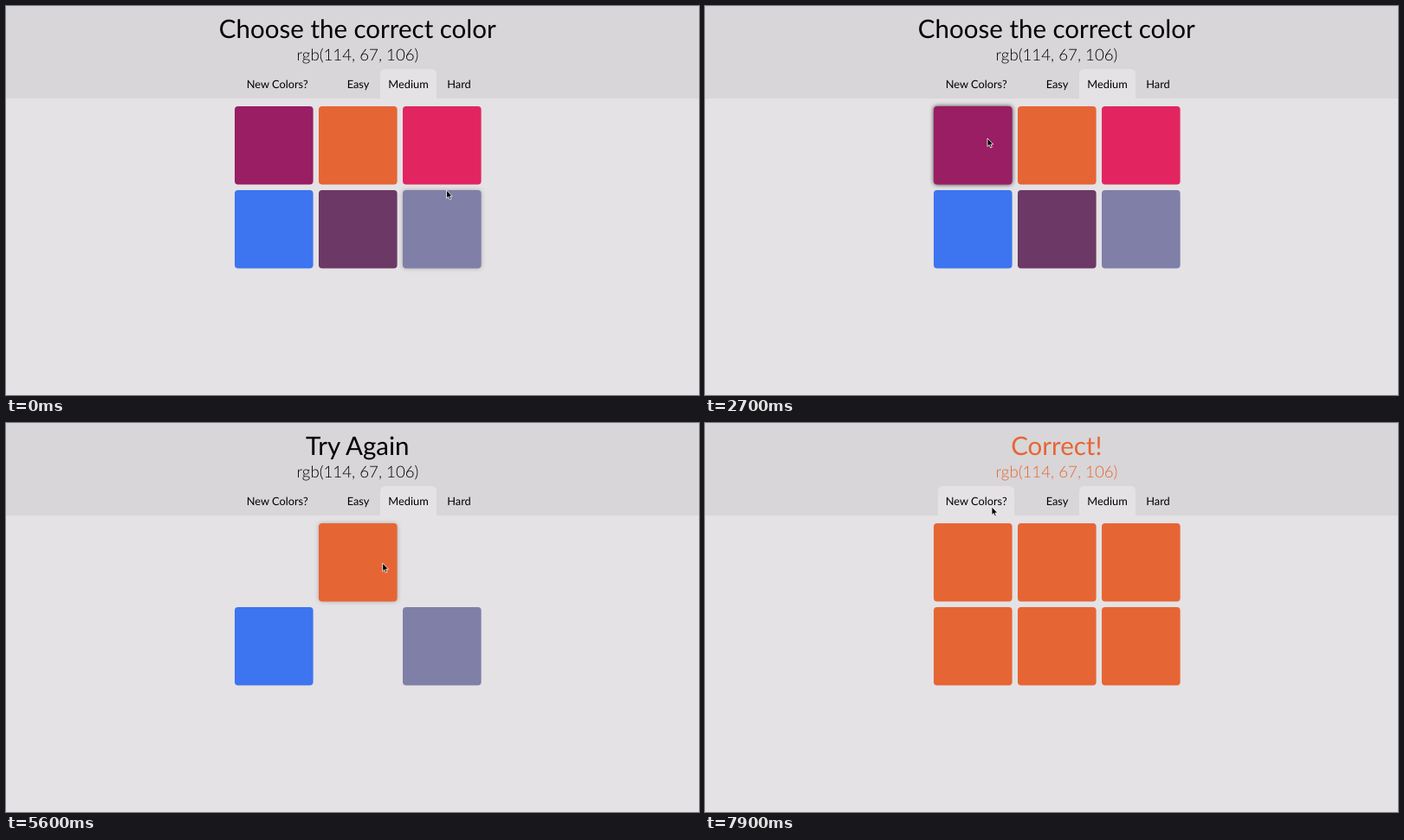
Animation, 800 px wide and 450 px high, one loop 8000 ms. Source, as an HTML page:

```html
<!DOCTYPE html>
<html lang="en">
<head>
<meta charset="utf-8">
<title>Choose the correct color</title>
<style>
  html, body { margin: 0; width: 100%; height: 100%; overflow: hidden; background: #e4e2e4; }
  svg { display: block; width: 800px; height: 450px; }
  text { font-family: Lato, sans-serif; text-anchor: middle; text-rendering: geometricPrecision; }
  #title { font-size: 29.5px; }
  #code { font-size: 18.7px; font-weight: 300; }
  #menu { font-size: 12.8px; }
</style>
</head>
<body>
<svg viewBox="0 0 800 450">
  <rect width="800" height="450" fill="#e4e2e4"/>
  <rect width="800" height="107" fill="#d8d6d8"/>
  <path id="tab" d="M269 107V79q0-6 6-6h76q6 0 6 6v28z" fill="#e4e2e4"/>
  <path d="M432 107V79q0-6 6-6h53q6 0 6 6v28z" fill="#e4e2e4"/>
  <text id="title" x="405.8" y="37.3"></text>
  <text id="code" x="406" y="63">rgb(114, 67, 106)</text>
  <g id="menu">
    <text x="313.2" y="95">New Colors?</text>
    <text x="406.5" y="95">Easy</text>
    <text x="464.5" y="95">Medium</text>
    <text x="523" y="95">Hard</text>
  </g>
  <g id="board"></g>
  <path id="cursor" d="M0 0V9.6L2.2 7.6L3.7 11L5.3 10.3L3.9 7H6.8Z" fill="#000" stroke="#fff" stroke-width=".8"/>
</svg>
<script>
const LOOP = 8000, STEP = 100, FADE = 700, HOVER = 300, SIZE = 90.6;
const BACK = [228, 226, 228], ORANGE = [230, 101, 52], WIN = 6100;
const $ = id => document.getElementById(id);

// colour and, for wrong guesses, the time of the click
const squares = [
  { rgb: [153, 30, 100], click: 2900 },
  { rgb: ORANGE },
  { rgb: [226, 37, 97], click: 4850 },
  { rgb: [61, 116, 239] },
  { rgb: [108, 56, 101], click: 4050 },
  { rgb: [127, 127, 168] }
].map((s, i) => {
  const x = 264 + i % 3 * 97, y = i < 3 ? 116 : 213;
  const el = document.createElementNS('http://www.w3.org/2000/svg', 'rect');
  const attrs = { x, y, width: SIZE, height: SIZE, rx: 4 };
  for (const name in attrs) el.setAttribute(name, attrs[name]);
  $('board').append(el);
  return { ...s, el, box: [x, y, SIZE, SIZE] };
});

// pointer stops: time, x, y
const path = [
  [-100, 505, 209], [-50, 508.5, 213], [1250, 508.5, 213],
  [2350, 326, 153], [3450, 326, 153], [3800, 396.5, 247],
  [4200, 396.5, 247], [4650, 522, 162.5], [5300, 522, 162.5],
  [5700, 418.5, 162], [7250, 418.5, 162], [7700, 331, 97]
];

const clamp = u => Math.min(1, Math.max(0, u));
const mix = (a, b, u) => a + (b - a) * u;
const blend = (a, b, u) => a.map((v, i) => mix(v, b[i], u));
const fade = (t, start) => 1 - (1 - clamp((t - start) / FADE)) ** 2;

function pointer(t) {
  const next = path.findIndex(p => p[0] > t);
  if (next < 1) return (next ? path[path.length - 1] : path[0]).slice(1);
  const a = path[next - 1], b = path[next];
  const u = (t - a[0]) / (b[0] - a[0]);
  return blend(a.slice(1), b.slice(1), u * u * (3 - 2 * u));
}

// share of the recent past that the pointer spent inside the box
function hover(t, [x, y, w, h]) {
  let hits = 0;
  for (let ago = 0; ago < HOVER; ago += 50) {
    const [px, py] = pointer(t - ago);
    if (px >= x && px <= x + w && py >= y && py <= y + h) hits++;
  }
  return hits * 50 / HOVER;
}

function draw(t) {
  const won = t >= WIN, reveal = fade(t, WIN);
  $('title').textContent = won ? 'Correct!' : t >= 2900 ? 'Try Again' : 'Choose the correct color';
  for (const id of ['title', 'code']) $(id).style.fill = won ? `rgb(${ORANGE})` : '#000';

  for (const { el, rgb, click, box } of squares) {
    const hidden = click ? fade(t, click) : 0;
    const color = blend(blend(rgb, BACK, hidden), ORANGE, reveal);
    const shadow = hover(t, box) * Math.max(1 - hidden, reveal);
    el.style.fill = `rgb(${color.map(Math.round)})`;
    el.style.filter = shadow ? `drop-shadow(0 0 2.8px rgba(0,0,0,${0.75 * shadow}))` : 'none';
  }

  $('tab').style.opacity = hover(t, [269, 73, 88, 34]);
  $('cursor').setAttribute('transform', `translate(${pointer(t)})`);
}

const start = performance.now();
function tick() {
  const t = (performance.now() - start) % LOOP;
  draw(Math.floor(t / STEP) * STEP);
  requestAnimationFrame(tick);
}
tick();
</script>
</body>
</html>
```
